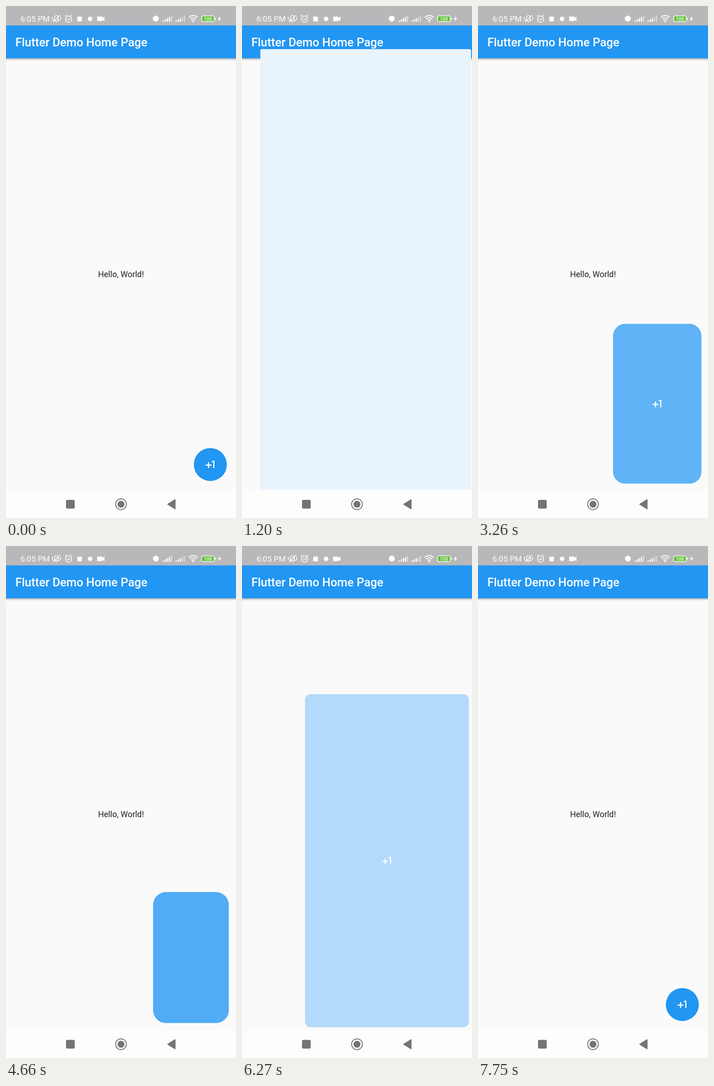
An HTML page for the animation above (7.79 s loop, 502 by 1116 pixels).

```html
<!DOCTYPE html>
<html lang="en">
<head>
<meta charset="utf-8">
<title>Expanding button</title>
<style>
  html, body { margin: 0; width: 100%; height: 100%; overflow: hidden; background: #fdfdfd; }
  svg { display: block; width: 502px; height: 1116px; font-family: Roboto, sans-serif; }
  .mid { text-anchor: middle; font-size: 17.9px; fill: #212121; }
  .bold { font-weight: 500; }
  .line { fill: none; stroke: #fff; stroke-width: 1.6; stroke-linecap: round; stroke-linejoin: round; }
  .soft { fill: #fff; opacity: .5; }
</style>
</head>
<body>
<svg viewBox="0 0 502 1116">
  <defs>
    <filter id="barShadow" x="-5%" y="-20%" width="110%" height="150%">
      <feDropShadow dx="0" dy="2" stdDeviation="2" flood-color="#000" flood-opacity=".34"/>
    </filter>
    <filter id="btnShadow" x="-10%" y="-20%" width="120%" height="160%">
      <feDropShadow dx="0" dy="2" stdDeviation="1.6" flood-color="#30305a" flood-opacity=".4"/>
    </filter>
  </defs>

  <g id="home">
    <rect width="502" height="1056" fill="#fafafa"/>
    <rect x="-10" y="30" width="522" height="84" fill="#2196f3" filter="url(#barShadow)"/>
    <text x="20.400" y="88" font-size="25.6" fill="#fff" class="bold">Flutter Demo Home Page</text>
    <text x="251" y="591" class="mid">Hello, World!</text>
  </g>

  <rect id="panel"/>
  <g id="plus" fill="#fff">
    <path transform="scale(1.278) translate(-12 -12)"
      d="M10 8H8v4H4v2h4v4h2v-4h4v-2h-4zM14.5 6.1V7.9L17 7.4V18h2V5z"/>
  </g>

  <g id="page">
    <rect width="502" height="1056" fill="#fdfdfd"/>
    <path d="M438 61l16 16m0-16l-16 16" stroke="#000" stroke-width="2.6"/>
    <text x="251" y="116" class="mid">Inner widget</text>
    <path d="M25 181.5h452" stroke="#94929c" stroke-width="1.2"/>
    <rect x="193" y="189.5" width="116.500" height="46" rx="5" fill="#2196f3" filter="url(#btnShadow)"/>
    <text x="251" y="218.600" class="mid bold" style="fill:#fff">Close me</text>
  </g>

  <g id="status">
    <rect width="502" height="42.300" fill="#b8b8ba"/>
    <text x="31.500" y="34" font-size="17.4" fill="#fff">6:05 PM</text>
    <g class="line">
      <path d="M104 32h12l-2-3v-4a4 4 0 0 0-8 0v4zM109 35h2M103 35L118 20M101 24v6M119 24v6"/>
      <circle cx="136.500" cy="28.500" r="6.800"/>
      <path d="M133.500 28l2.500 2.500 4-4M129 22l3-2.500M144 22l-3-2.500"/>
      <path d="M399.500 24.500a12.500 12.500 0 0 1 18 0M402.500 28a8.500 8.500 0 0 1 12 0M405.500 31.300a4.500 4.500 0 0 1 6 0" stroke-width="2"/>
      <rect x="427" y="21.500" width="27.500" height="12.500" rx="3.500" fill="#5fbe35"/>
    </g>
    <g fill="#fff">
      <rect x="155.500" y="23" width="10" height="10.500" rx="1"/>
      <circle cx="183.500" cy="28" r="5"/>
      <path d="M199 23h11v3l5-3v10l-5-3v3h-11z"/>
      <circle cx="327" cy="27.500" r="6.500"/>
      <circle cx="408.500" cy="34" r="1.700"/>
      <rect x="456" y="25.500" width="2" height="4.500" rx="1"/>
      <path d="M467.500 22l-5.500 6.500h3.500l-1.500 5 6-6.500h-3.700z"/>
      <text x="440.800" y="31.800" font-size="10.5" text-anchor="middle" class="bold">100</text>
    </g>
    <g id="bars"></g>
  </g>

  <g id="nav" fill="#747474">
    <rect y="1056" width="502" height="60" fill="#fdfdfd"/>
    <rect x="131" y="1076.500" width="19" height="19" rx="3"/>
    <circle cx="251" cy="1086" r="11.800" fill="none" stroke="#747474" stroke-width="2"/>
    <circle cx="251" cy="1086" r="7.600"/>
    <path d="M353 1086l16-10v20z" stroke="#747474" stroke-width="2" stroke-linejoin="round"/>
  </g>
</svg>
<script>
  const LOOP = 7790, STEP = LOOP / 189, FLIGHT = 300;
  // [start time, opening?]
  const flights = [[1004.3, true], [3118.3, false], [4585, true], [6178.5, false]];
  const closed = { x: 410, y: 963.5, r: 482, b: 1035.3 };
  const open = { x: 0, y: 0, r: 502, b: 1056 };
  const blue = [33, 150, 243], pale = [253, 253, 253];

  const el = id => document.getElementById(id);
  const panel = el('panel'), plus = el('plus'), page = el('page');
  const mix = (a, b, p) => a + (b - a) * p;
  const set = (node, attrs) => {
    for (const k in attrs) node.setAttribute(k, attrs[k]);
  };
  const show = (node, on) => node.setAttribute('visibility', on ? 'visible' : 'hidden');

  // cubic-bezier(.4, 0, .2, 1)
  function ease(x) {
    let lo = 0, hi = 1;
    for (let i = 0; i < 24; i++) {
      const u = (lo + hi) / 2, v = 1 - u;
      if (1.2 * v * v * u + 0.6 * v * u * u + u ** 3 < x) lo = u; else hi = u;
    }
    return lo * lo * (3 - 2 * lo);
  }

  // Two signal meters, the last bars dimmed
  for (const [x0, full] of [[342, 4], [370, 3]]) {
    for (let i = 0; i < 5; i++) {
      const bar = document.createElementNS('http://www.w3.org/2000/svg', 'rect');
      const h = 3 + i * 2.5;
      set(bar, { x: x0 + i * 4.5, y: 34.5 - h, width: 2.6, height: h, rx: 0.8, fill: '#fff' });
      if (i >= full) bar.setAttribute('class', 'soft');
      el('bars').append(bar);
    }
  }

  function draw(t) {
    let p = 0, opening = false, flying = false;
    for (const [start, up] of flights) {
      if (t < start) break;
      const s = Math.min(1, (t - start) / FLIGHT);
      p = up ? ease(s) : 1 - ease(s);
      opening = up;
      flying = s < 1;
    }
    const x = mix(closed.x, open.x, p), y = mix(closed.y, open.y, p);
    const r = mix(closed.r, open.r, p), b = mix(closed.b, open.b, p);
    const fill = blue.map((c, i) => Math.round(mix(c, pale[i], p)));
    set(panel, { x, y, width: r - x, height: b - y, rx: 36 * (1 - p), fill: `rgb(${fill})` });
    set(plus, { transform: `translate(${(x + r) / 2} ${(y + b) / 2})` });
    show(plus, !opening);
    show(page, opening && !flying);
  }

  const hold = t => Math.floor(t / STEP + 0.1) * STEP % LOOP;

  const begin = performance.now();
  function tick() {
    draw(hold((performance.now() - begin) % LOOP));
    requestAnimationFrame(tick);
  }
  draw(0);
  requestAnimationFrame(tick);
</script>
</body>
</html>
```
